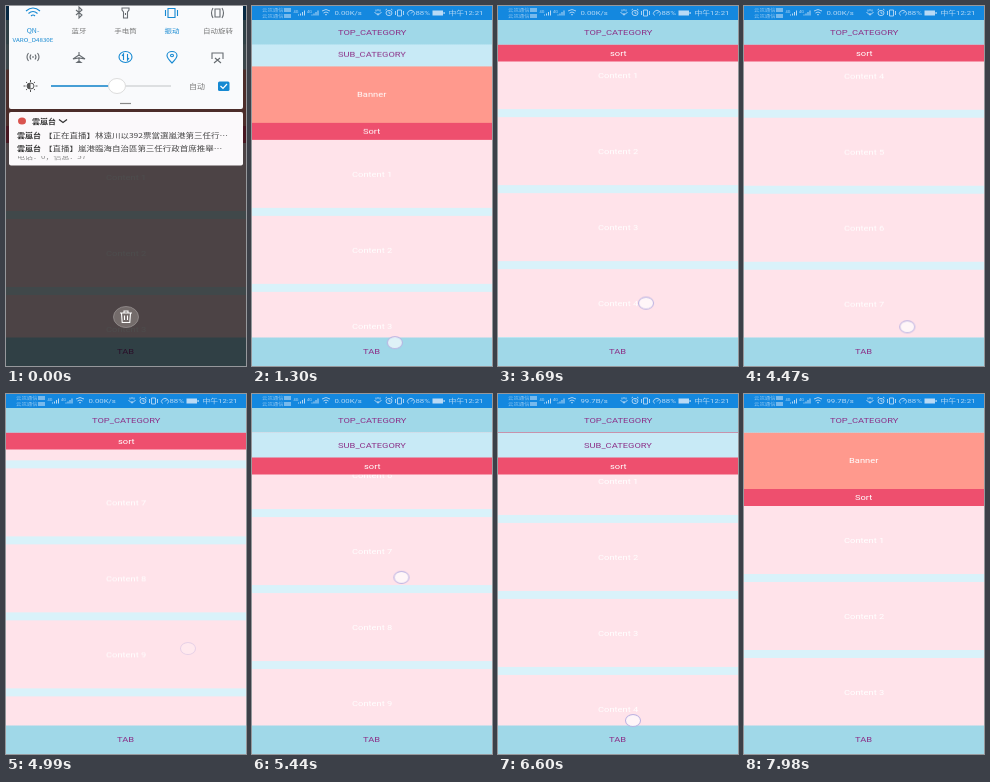
These frames come from a looping animation (240 by 360 pixels, 8 s). An HTML page:

```html
<!DOCTYPE html>
<html lang="zh">
<head>
<meta charset="utf-8">
<title>Sticky sort bar</title>
<style>
  html, body { margin: 0; width: 100%; height: 100%; overflow: hidden; }
  body { background: #d9f2fa; font: 9.33px Roboto, "Noto Sans CJK SC", "Noto Sans CJK", sans-serif; }
  #stage { position: relative; width: 240px; height: 360px; overflow: hidden; background: #d9f2fa; }
  #stage > *, .row { position: absolute; left: 0; width: 240px; }
  .row { display: grid; place-items: center; color: #fff; }
  .row span { transform: scaleY(.75); }

  /* Bars end on a half-covered pixel row */
  .top, .sub, .tab { color: #8c3389; }
  .top { top: 14px; height: 25px; background: linear-gradient(#a0d8e8 24px, #a0d8e880 0); }
  .tab { top: 331px; height: 29px; background: linear-gradient(#a0d8e880 1px, #a0d8e8 0); }
  .sub { top: 14px; height: 25px; background: linear-gradient(#c8eaf6 24px, #c8eaf680 0); animation: sub 8s linear infinite; }
  .pin { top: 38px; height: 18px; background: linear-gradient(#ee4f6e 17px, #ee4f6e80 0); opacity: 0; animation: pin 8s linear infinite; }

  /* Page */
  #list { top: 0; animation: scroll 8s linear infinite; }
  .banner { top: 38px; height: 57px; background: #ff998d; }
  .sort { top: 95px; height: 17px; background: #ee4f6e; }
  .items { position: absolute; top: 112px; width: 240px; }
  .items .row { position: relative; height: 68px; margin-bottom: 8px; background: #ffe3ea; }
  #status { top: 0; height: 14px; }
  .slow { animation: slow 8s infinite; }
  .fast { animation: fast 8s infinite; }

  #stage > #touch {
    width: 14px; height: 11px; left: -8px; top: -6.5px; border: 1px solid #b7aee0;
    border-radius: 50%; background: #fffa; opacity: 0; animation: touch 8s linear infinite;
  }

  /* Notification shade */
  #scrim { top: 0; height: 360px; background: #000; animation: scrim 8s linear infinite; }
  #shade, #bin { top: 0; height: 360px; }
  #shade { animation: shade 8s linear infinite; }
  #bin { animation: bin 8s linear infinite; }

  @keyframes scroll {
    0%, 14.8% { transform: translateY(25px); }
    26.375%, 30.5% { transform: translateY(0); }
    32.5% { transform: translateY(-11px); }
    40.5%, 43.5% { transform: translateY(-56px); }
    46.125% { transform: translateY(-76.5px); }
    50% { transform: translateY(-200px); animation-timing-function: ease-out; }
    53.5% { transform: translateY(-278px); }
    55.5% { transform: translateY(-290px); }
    58.75% { transform: translateY(-410px); }
    62.375% { transform: translateY(-493.5px); animation-timing-function: ease-out; }
    63.875%, 65.25% { transform: translateY(-505px); }
    74.25% { transform: translateY(-309.5px); animation-timing-function: ease-out; }
    77.5% { transform: translateY(-250px); }
    82.5% { transform: translateY(-59.5px); }
    83.4% { transform: translateY(-31px); animation-timing-function: ease-out; }
    90.875%, 92.625% { transform: translateY(25px); }
    99%, 100% { transform: translateY(0); }
  }
  @keyframes sub {
    0%, 14.8% { transform: translateY(25px); }
    26.375%, 65.5% { transform: translateY(0); }
    68%, 92.625% { transform: translateY(25px); }
    99%, 100% { transform: translateY(0); }
  }
  @keyframes pin {
    0%, 41% { opacity: 0; transform: translateY(0); }
    41.01%, 65.5% { opacity: 1; transform: translateY(0); }
    68%, 83.4% { opacity: 1; transform: translateY(25px); }
    83.41%, 100% { opacity: 0; transform: translateY(25px); }
  }
  @keyframes touch {
    0%, 14.25% { opacity: 0; transform: translate(142px, 341px); }
    14.5% { opacity: 1; transform: translate(142px, 341px); }
    25% { opacity: 1; transform: translate(147px, 312px); }
    26% { opacity: 0; transform: translate(147px, 311px); }
    30.4% { opacity: 0; transform: translate(146px, 318px); }
    30.6% { opacity: 1; transform: translate(146px, 318px); }
    32.5% { opacity: 1; transform: translate(146px, 307px); }
    40% { opacity: 1; transform: translate(150px, 263px); }
    40.8% { opacity: 0; transform: translate(150px, 262px); }
    43.4% { opacity: 0; transform: translate(146px, 317px); }
    43.6% { opacity: 1; transform: translate(146px, 317px); }
    46.125% { opacity: 1; transform: translate(148px, 297px); }
    50% { opacity: 1; transform: translate(160px, 175px); }
    51% { opacity: 0; transform: translate(163px, 160px); }
    55.2% { opacity: 0; transform: translate(162px, 325px); }
    55.5% { opacity: 1; transform: translate(162px, 325px); }
    61.2% { opacity: 1; transform: translate(181px, 256px); }
    62.375% { opacity: .35; transform: translate(182px, 254px); }
    63% { opacity: 0; transform: translate(182px, 253px); }
    65% { opacity: 0; transform: translate(155px, 123px); }
    65.25% { opacity: 1; transform: translate(155px, 123px); }
    74.25% { opacity: 1; transform: translate(137px, 318px); }
    75% { opacity: 0; transform: translate(136px, 326px); }
    77.2% { opacity: 0; transform: translate(128px, 136px); }
    77.5% { opacity: 1; transform: translate(128px, 136px); }
    82.5% { opacity: 1; transform: translate(135px, 326px); }
    83.5% { opacity: 0; transform: translate(135px, 328px); }
    92.4% { opacity: 0; transform: translate(140px, 322px); }
    92.7% { opacity: 1; transform: translate(140px, 322px); }
    97.8% { opacity: 1; transform: translate(145px, 300px); }
    98.8%, 100% { opacity: 0; transform: translate(145px, 299px); }
  }
  @keyframes slow { 0%, 69% { opacity: 1; } 69.01%, 100% { opacity: 0; } }
  @keyframes fast { 0%, 69% { opacity: 0; } 69.01%, 100% { opacity: 1; } }
  @keyframes scrim { 0%, 1.125% { opacity: .7; } 8.625%, 100% { opacity: 0; } }
  @keyframes shade {
    0%, 1.125% { transform: translateY(0); animation-timing-function: ease-in-out; }
    8.5%, 100% { transform: translateY(-170px); }
  }
  @keyframes bin { 0%, 1.125% { opacity: 1; } 5%, 100% { opacity: 0; } }
</style>
</head>
<body>
<div id="stage">
  <div id="list">
    <div class="row banner"><span>Banner</span></div>
    <div class="row sort"><span>Sort</span></div>
    <div class="items">
      <div class="row"><span>Content 1</span></div>
      <div class="row"><span>Content 2</span></div>
      <div class="row"><span>Content 3</span></div>
      <div class="row"><span>Content 4</span></div>
      <div class="row"><span>Content 5</span></div>
      <div class="row"><span>Content 6</span></div>
      <div class="row"><span>Content 7</span></div>
      <div class="row"><span>Content 8</span></div>
      <div class="row"><span>Content 9</span></div>
      <div class="row"><span>Content 10</span></div>
    </div>
  </div>
  <div class="row pin"><span>sort</span></div>
  <div class="row sub"><span>SUB_CATEGORY</span></div>
  <div class="row top"><span>TOP_CATEGORY</span></div>
  <div class="row tab"><span>TAB</span></div>

  <svg id="status" viewBox="0 0 240 14" fill="#b9daf5" font-size="7.8">
    <path d="M0 0H240V14H0z" fill="#1488df"/>
    <g font-size="5.4" opacity=".8">
      <text transform="translate(10 6) scale(1 .75)">云岚通信</text>
      <text transform="translate(10 12) scale(1 .75)">云岚通信</text>
    </g>
    <path d="M32 2h7v4h-7zM32 8h7v4h-7z" opacity=".6"/>
    <g id="signal">
      <text transform="translate(41.500 6.500) scale(1 .75)" font-size="4">4G</text>
      <path d="M46 9.500v-1h1v1zM48 9.500v-2h1v2zM50 9.500v-3.500h1v3.500zM52 9.500v-5h1v5z"/>
    </g>
    <use href="#signal" x="13.500"/>
    <g fill="none" stroke="#b9daf5" stroke-width=".9">
      <path d="M70 5q4-3 8 0M71.500 7q2.500-2 5 0M73 8.700h2"/>
      <path d="M122.500 6q3.500 5 7 0M124 5.500v-2M126 5v-2M128 5.500v-2M126 7v2.500"/>
      <ellipse cx="137" cy="7" rx="3" ry="2.600"/>
      <path d="M137 5.500v1.700h1.500M133.500 4l1.500-1M140.500 4l-1.500-1"/>
      <path d="M145.500 4h4v6h-4zM143.500 5v4M151.500 5v4"/>
      <path d="M156.500 9.500a3.500 3 0 1 1 5 0M159 7.500l2-2"/>
    </g>
    <path d="M180.500 4.500h10.500v5h-10.500zM191.500 6h1.200v2h-1.200z"/>
    <text class="slow" transform="translate(82.500 9.300) scale(1 .75)">0.00K/s</text>
    <text class="fast" transform="translate(82.500 9.300) scale(1 .75)">99.7B/s</text>
    <text transform="translate(163.500 9.300) scale(1 .75)">88%</text>
    <text transform="translate(196.500 9.300) scale(1 .75)">中午12:21</text>
  </svg>

  <div id="touch"></div>
  <div id="scrim"></div>

  <svg id="bin" viewBox="0 0 240 360">
    <ellipse cx="120" cy="311" rx="12.500" ry="10.500" fill="#746c6b" stroke="#969090" stroke-width=".8"/>
    <path d="M114 307h12M118 307v-2h4v2M115.500 307l.7 9.500h7.600l.7-9.500M118.500 309.500v4.500M121.500 309.500v4.500" fill="none" stroke="#fff" stroke-width="1.100"/>
  </svg>

  <svg id="shade" viewBox="0 0 240 360" fill="#777" font-size="8" font-family="'Noto Sans CJK SC', 'Noto Sans CJK', 'Noto Sans', sans-serif">
    <path d="M3 0H237V101q0 2-2 2H5q-2 0-2-2z" fill="#f9fafc"/>
    <rect x="3" y="106" width="234" height="53.500" rx="2" fill="#fbf9fb"/>

    <g fill="none" stroke="#666b70" stroke-width="1.100">
      <g stroke="#1689d2">
        <path d="M20 5q7-6 14 0M22.500 7.500q4.500-4 9 0M25 10q2-2 4 0"/>
        <path d="M162 2.500h7v9h-7zM159.500 4v6M171.500 4v6"/>
        <ellipse cx="119.500" cy="51" rx="6.500" ry="5.500"/>
        <path d="M117.500 54v-6l-1.500 2M121.500 48v6l1.500-2"/>
        <path d="M166 57q-5-5-5-7.500a5 4 0 0 1 10 0q0 2.500-5 7.500z"/>
        <ellipse cx="166" cy="49.500" rx="1.500" ry="1.200"/>
      </g>
      <path d="M70 4l6 5-3 3V1l3 3-6 5"/>
      <path d="M116 2h7v2l-1.500 2v6h-4V6L116 4zM119.500 7v2"/>
      <path d="M209 3h5v8h-5zM207 2q-3 5 0 10M216 2q3 5 0 10"/>
      <path d="M22.500 47q-3 4 0 8M25 48.500q-2 2.500 0 5M31.500 47q3 4 0 8M29 48.500q2 2.500 0 5M27 50v2"/>
      <path d="M73 46v3l6 4-6-1v3l2 1.500h-4l2-1.500v-3l-6 1 6-4z"/>
      <path d="M206 53v-6h11v6M208 57l6-5M215 57l-6-5"/>
    </g>
    <g text-anchor="middle">
      <g fill="#1689d2" font-weight="500">
        <text transform="translate(27 27) scale(1 .8)" font-size="7">QN-</text>
        <text transform="translate(27 35.500) scale(1 .8)" font-size="6.200">VARO_D4830E</text>
        <text transform="translate(166 27) scale(1 .8)" font-size="7.500">振动</text>
      </g>
      <g font-size="7.500">
        <text transform="translate(73 27) scale(1 .8)">蓝牙</text>
        <text transform="translate(119.500 27) scale(1 .8)">手电筒</text>
        <text transform="translate(212 27) scale(1 .8)">自动旋转</text>
      </g>
    </g>

    <g fill="none" stroke="#555">
      <ellipse cx="24.500" cy="80" rx="3.500" ry="3"/>
      <path d="M24.500 74v2M24.500 84v2M17.500 80h2M29.500 80h2M20 76l1.200 1M29 76l-1.200 1M20 84l1.200-1M29 84l-1.200-1"/>
    </g>
    <path d="M24.500 77a3.500 3 0 0 0 0 6z" fill="#555"/>
    <path d="M45 80H165" stroke="#d4d6d8" stroke-width="1.500"/>
    <path d="M45 80H111" stroke="#1689d2" stroke-width="1.500"/>
    <ellipse cx="111" cy="80" rx="8.500" ry="7.500" fill="#fff" stroke="#ddd"/>
    <text transform="translate(183 83) scale(1 .8)">自动</text>
    <rect x="212" y="75.500" width="11.500" height="9.500" rx="1.500" fill="#1689d2"/>
    <path d="M214.500 80l2.500 2.500 4-4.500" fill="none" stroke="#fff" stroke-width="1.200"/>
    <path d="M114 97.500H125" stroke="#888" stroke-width="1.200"/>

    <ellipse cx="16" cy="115" rx="4" ry="3.500" fill="#d9544f"/>
    <g fill="#333" font-weight="700">
      <text transform="translate(26 118) scale(1 .8)">雲嵐台</text>
      <text transform="translate(11 132) scale(1 .8)">雲嵐台</text>
      <text transform="translate(11 144.500) scale(1 .8)">雲嵐台</text>
    </g>
    <path d="M53 113.500l4 3 4-3" fill="none" stroke="#333" stroke-width="1.200"/>
    <g fill="#444" font-size="8.500">
      <text transform="translate(38 132) scale(1 .8)">【正在直播】林遠川以392票當選嵐港第三任行…</text>
      <text transform="translate(38 144.500) scale(1 .8)">【直播】嵐港臨海自治區第三任行政首席推舉…</text>
    </g>
    <text transform="translate(11 153) scale(1 .8)" fill="#888">电话：0，信息：57</text>
    <path d="M3 146.500H237V150H3z" fill="#fbf9fb"/>
  </svg>
</div>
</body>
</html>
```
